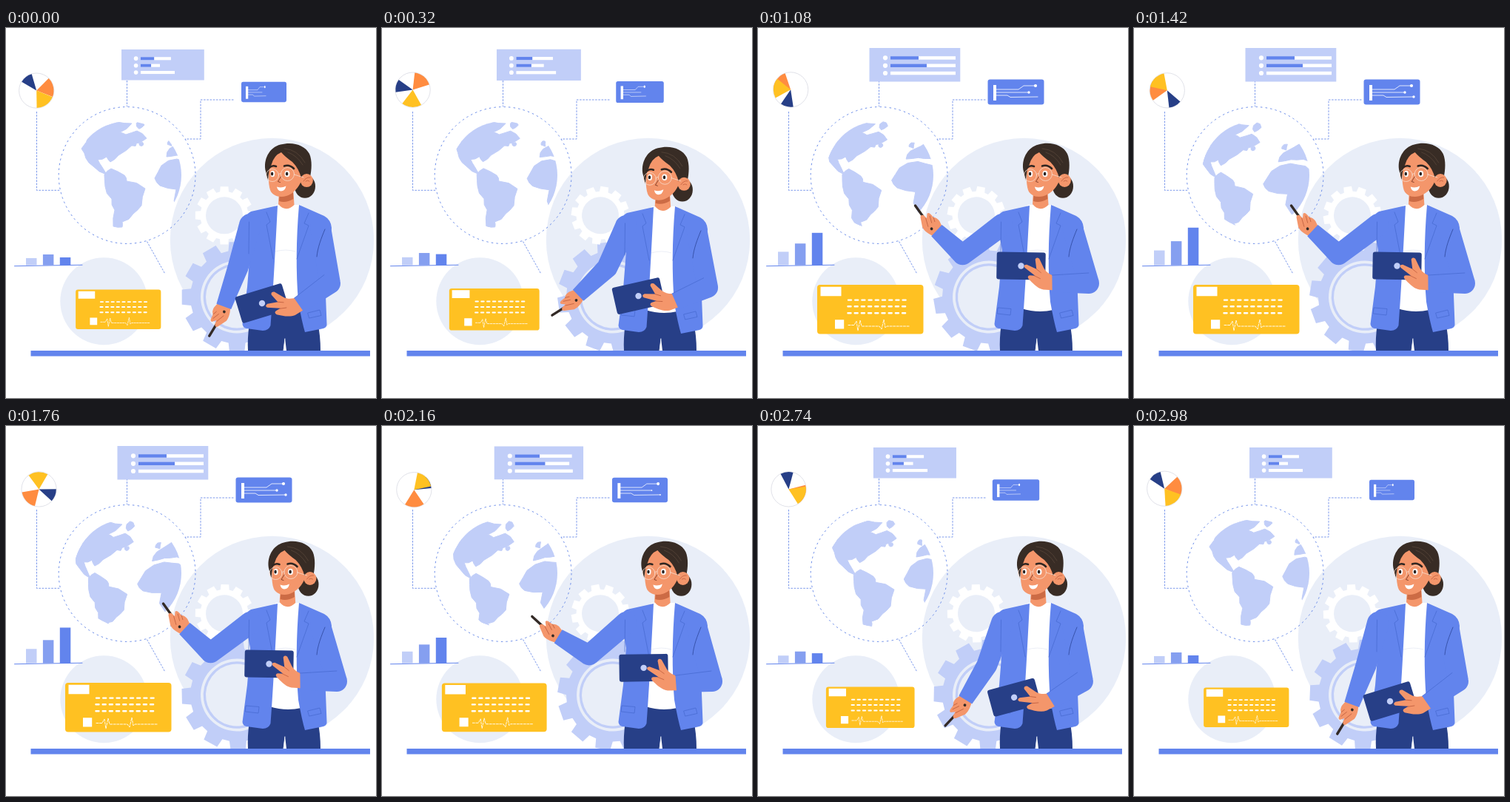
Animation of 500 by 500 pixels, one loop 3 s. Source, as an HTML page:

```html
<!DOCTYPE html>
<html lang="en">
<head>
<meta charset="utf-8">
<title>Data presentation</title>
<style>
  html, body { margin: 0; width: 100%; height: 100%; overflow: hidden; background: #fff; }
  svg { display: block; width: 100vw; height: 100vh; }
  .pale { fill: #e9eef8; }
  .sky { fill: #c1cef8; }
  .mid { fill: #859ff0; }
  .blue { fill: #6284ed; }
  .navy { fill: #273f87; }
  .gold { fill: #ffc122; }
  .white { fill: #fff; }
  .skin { fill: #f4966b; }
  .hair { fill: #382c25; }
  .line { fill: none; stroke-linecap: round; stroke-linejoin: round; }
  .link { fill: none; stroke: #5b7fe6; stroke-width: .8; stroke-dasharray: 2.6 1.6; }
  .seam { stroke: #4163c9; stroke-width: .6; }
  .crease { stroke: #b9583a; stroke-width: .7; }
</style>
</head>
<body>
<svg viewBox="0 0 500 500">
  <defs><clipPath id="disc"><circle cx="164" cy="199" r="73"/></clipPath></defs>

  <circle class="pale" cx="359.5" cy="286.5" r="137.7"/>
  <circle class="pale" cx="132.3" cy="369.3" r="59"/>
  <g id="bigGear">
    <path class="sky"/>
    <circle class="pale" r="49"/><circle class="sky" r="45.3"/><circle class="pale" r="42"/>
  </g>
  <g id="smallGear"><path class="white"/><circle class="pale" r="25"/></g>

  <circle class="link" cx="163.6" cy="199" r="92.4" style="stroke-width:.9;stroke-dasharray:2.5 4.1"/>
  <path class="link" d="M163.5 71V106M307.5 97H263V150H242M41.5 113V219.3H73M190.5 288.5L214.5 331.5"/>
  <g clip-path="url(#disc)"><path id="land" class="sky" stroke="#c1cef8" stroke-linejoin="round"/></g>

  <g id="pie">
    <circle r="23.6" fill="#fff" stroke="#d8dae2" stroke-width=".8"/>
    <path class="navy"/><path fill="#ff8c40"/><path class="gold"/>
  </g>

  <g id="list">
    <path class="sky" d="M150.5 27H273.3V72.6H150.5Z"/>
    <g class="white"><circle cx="172" cy="40.3" r="3.1"/><circle cx="172" cy="50.8" r="3.1"/><circle cx="172" cy="61" r="3.1"/></g>
    <g id="meters"></g>
  </g>

  <g id="chip">
    <rect class="blue" x="310.5" y="69.5" width="76" height="34" rx="3"/>
    <path class="white" d="M318 77h4v21h-4z"/>
    <g id="wires">
      <path class="line" stroke="#fff" stroke-width=".8" d="M0-4H30L37-9H53M0 0H44M0 4H15L19 6.5 56 6"/>
      <g class="white"><circle cx="53" cy="-9" r="2.1"/><circle id="dotB" cx="44" r="1.7"/><circle id="dotC" cx="56" cy="6" r="1.7"/></g>
    </g>
  </g>

  <path class="line" stroke="#6284ed" d="M11.5 321.7L103 320.2"/>
  <g id="bars"></g>

  <g id="card">
    <rect class="gold" x="80" y="347" width="143.5" height="66.6" rx="4"/>
    <path class="white" d="M84.5 349.7h28v12.500h-28zM104 394.300h12.200v12.200H104z"/>
    <path class="line" stroke="#fff" stroke-width="2.4" stroke-dasharray="4 5.2" d="M122 367.6H201M121.5 376.3H201M121.5 385.3H201"/>
    <path class="line" stroke="#fff" stroke-width=".9" stroke-dasharray="3 1.600" d="M122 401.500H130L133 396 135 409 138 395 140 403H164L167 407 170 394 172 405 174 403H205"/>
  </g>

  <path class="navy" d="M329 398Q326 420 327 436H374.5L377 419 379 436H425Q425 415 421 398L397 378H356Z"/>
  <path class="line" stroke="#e9eef8" d="M376.8 420L375.5 435.5"/>

  <g id="body">
    <path class="white" d="M364 239L398 239 399 381Q378 386 356 379Z"/>
    <path class="line" stroke="#e3e7f2" stroke-width=".7" d="M364 302Q378 298 391 302"/>
    <path class="blue" d="M367 240L331 248Q322 252 323 263L330 300 326 350 319.500 400Q320 405 325 406L347 409Q355 409 357.500 402Q362 340 367 240Z"/>
    <path class="blue" d="M396 239L430 254Q439 259 440 270L431 335 433.500 400Q434 404 429 406L404 411Q400 398 395 370 390 310 396 239Z"/>
    <path class="line seam" d="M352 249L357 262 352 266 361 312M409 250L403 264 409 267 393 312M324.5 378L342 379.5 341 388 323.5 386ZM408 385L424 381 426 388.5 410 392Z"/>

    <g id="penHand">
      <path class="line" stroke="#332a26" stroke-width="3.4" d="M5-3L44 4.800"/>
      <path class="skin" d="M-4-8C4-11 11-12 17-10L28-2Q31 1 27 3L21 3 25 8Q25 11 20 10.500L15 10Q12 13 6 12L-4 8Z"/>
      <path class="line crease" d="M12-4L22 2M12 3L20 8M10 7L15 10"/>
      <circle cx="6.5" cy="-3" r="1.9" fill="#332a26"/>
    </g>
    <path id="armL" class="blue"/>
    <path class="line seam" d="M328.5 262L328 305"/>

    <g id="tablet">
      <rect class="navy" x="-33" y="-18.5" width="66" height="37" rx="3"/>
      <circle class="sky" r="4.200"/>
    </g>
    <g id="holdHand">
      <path class="skin" d="M-4-9L12-8C21-6 27 2 32 7Q34 11 30 11.500L23 11 37 22Q39 26 34 26L21 20 22.500 33Q21 37 17 34L11 21C8 15 2 12-4 10Z"/>
      <path class="line crease" d="M24 11L16 7M21 20L15 15"/>
    </g>
    <path id="armR" class="blue"/>
    <path class="line" stroke="#2e479b" stroke-width=".8" d="M431 272C426 284 421 297 420 309"/>
    <path id="seamR" class="line seam"/>
  </g>

  <g id="neck">
    <path class="skin" d="M369 220L368 238Q378 250 389.5 239L388 216Z"/>
    <path fill="#cc6b45" d="M369.5 227Q380 229 388 222L388.3 231Q378 237 369 234Z"/>
  </g>
  <g id="head">
    <ellipse class="hair" cx="404" cy="214" rx="14" ry="15.8"/>
    <path class="skin" d="M357 176C354 192 354 210 357 219C361 229 374 230 383 225C392 220 398 212 400 203L402 172Q374 160 357 176Z"/>
    <path class="hair" d="M351 194C347 178 356 161 371 157.500C387 153 404 158 410 170C414 179 413 192 411 201L399 203Q396 190 387 181 377 174 372 168 362 172 358.500 185Q355 190 354 206Z"/>
    <path class="line" stroke="#5c4a3d" stroke-width=".7" d="M376 163Q394 164 404 182M381 168Q393 172 401 185"/>
    <ellipse class="skin" cx="406.3" cy="206" rx="8.6" ry="9"/>
    <path class="line crease" d="M402 207Q406 201 411 202M405 207Q408 205 410 207"/>
    <path class="line" stroke="#2f2622" stroke-width="2.6" d="M356 188.5Q360 185 365 187M376 186.500Q383 184 389 190"/>
    <g class="white"><ellipse cx="360.300" cy="197" rx="2.900" ry="4.200"/><ellipse cx="380" cy="197" rx="3.500" ry="4.300"/></g>
    <g fill="#2a2220"><ellipse cx="359.600" cy="197" rx="1.700" ry="2.500"/><ellipse cx="379.600" cy="197" rx="1.800" ry="2.600"/></g>
    <g class="line" stroke="#f8dccd" stroke-width=".8"><circle cx="360" cy="199" r="8.500"/><circle cx="380.500" cy="197.500" r="9"/><path d="M368.500 197.500Q370 196 371.500 197M389.500 198L402 202"/></g>
    <path class="line" stroke="#7d3a28" stroke-width=".9" d="M371.500 201L367.500 207.500 370.500 208.500"/>
    <path class="white" d="M366 214.500Q372 217 378.500 213.500 377 220.500 371.500 220.500 367 220 366 214.500Z"/>
  </g>

  <path class="blue" d="M33.5 436H492V443.500H33.5Z"/>
</svg>
<script>
const LOOP = 3000;
const $ = id => document.getElementById(id);
const mix = (a, b, k) => a + (b - a) * k;
const clamp = x => Math.min(1, Math.max(0, x));
const ease = x => (1 - Math.cos(Math.PI * clamp(x))) / 2;
const rad = d => d * Math.PI / 180;
const polar = (r, deg) => [r * Math.cos(rad(deg)), r * Math.sin(rad(deg))];
const reach = (p, len, deg) => polar(len, deg).map((v, i) => v + p[i]);
const poly = pts => 'M' + pts.map(p => p.map(v => v.toFixed(2)).join(' ')).join('L') + 'Z';
const move = (id, x, y, turn = 0) => $(id).setAttribute('transform', `translate(${x} ${y}) rotate(${turn})`);
const zoom = (id, x, y, s) => $(id).setAttribute('transform', `translate(${x} ${y}) scale(${s}) translate(${-x} ${-y})`);

// Eases up from the start, waits, then comes down in a second.
const hold = (t, back, rise = 1000) => t < back ? ease(t / rise) : 1 - ease((t - back) / 1000);

function addRect(id, cls, x, y, width, height) {
  const r = document.createElementNS('http://www.w3.org/2000/svg', 'rect');
  Object.entries({ class: cls, x, y, width, height }).forEach(a => r.setAttribute(...a));
  return $(id).appendChild(r);
}

let seed = 7;
const random = () => (seed = seed * 16807 % 2147483647) / 2147483647;

// --- Gears
function gear(outer, inner, teeth = 12) {
  const pts = [];
  for (let i = 0; i < teeth; i++)
    for (const [r, k] of [[inner, -.35], [outer, -.26], [outer, .26], [inner, .35]])
      pts.push(polar(r, (i + k) * 360 / teeth));
  return poly(pts);
}
$('bigGear').firstElementChild.setAttribute('d', gear(75, 63));
$('smallGear').firstElementChild.setAttribute('d', gear(39.5, 32.5));

// --- Globe: a few key points per coast, roughened between them
const coast = text => {
  const pts = text.split(' ').map(p => p.split(',').map(Number));
  return pts.flatMap((p, i) => {
    const q = pts[(i + 1) % pts.length], bend = (random() - .35) * .22;
    return [p, [(p[0] + q[0]) / 2 + (q[1] - p[1]) * bend, (p[1] + q[1]) / 2 - (q[0] - p[0]) * bend]];
  });
};
const island = (x, y, r) => Array.from({ length: 7 }, (_, i) => reach([x, y], r * (.5 + random() * .7), i * 51));
const land = [
  coast('102,163 112,144 125,135 150,127 170,129 154,141 162,144 177,139 190,149 172,157 152,172 141,181 136,174 124,178 130,188 136,198 118,187 108,176'),
  coast('133,198 142,190 160,199 163,207 188,217 183,240 172,251 157,262 157,269 145,268 147,246 143,231 134,214'),
  coast('201,203 210,186 231,177 247,182 265,200 258,232 244,247 232,248 230,218 208,213'),
  coast('217,174 221,163 240,148 258,178 244,173 231,172'),
  island(221, 156, 4), island(181, 131, 7), island(173, 157, 3.5), island(183, 157, 3)
];

function drawLand(t) {
  const lin = 1 - Math.abs(1 - t / 1500);
  const turn = .29 * mix(lin, ease(lin), .3);
  const drop = t > 1000 ? 11 * Math.sin(Math.PI * (t - 1000) / 2000) : 0;
  const R = 97, rim = 72.5, roll = .2 * turn;
  const spin = ([px, py]) => {
    const x = px - 164, y = py - 199, z = Math.sqrt(Math.max(0, R * R - x * x - y * y));
    const u = x * Math.cos(turn) - z * Math.sin(turn) - roll * y;
    const v = y + roll * x + drop * Math.max(0, z - 50) / 47;
    const fit = Math.min(1, rim / Math.max(rim, Math.hypot(u, v)) + (Math.hypot(x, y) > rim ? 1 : 0));
    return [164 + u * fit, 199 + v * fit];
  };
  $('land').setAttribute('d', land.map(s => poly(s.map(spin))).join(''));
}

// --- Charts
function drawPie(t) {
  const a = 2 * Math.PI * t / LOOP;
  move('pie', 43 - 1.8 * Math.cos(a), 84.6 - 1.6 * Math.sin(a));
  const slice = (i, from, size, dir) => {
    const start = from + dir * 360 * t / LOOP - 90;
    const d = `M0 0L${polar(23.3, start)}A23.3 23.3 0 0 1 ${polar(23.3, start + size)}Z`;
    $('pie').querySelectorAll('path')[i].setAttribute('d', d);
  };
  slice(0, 301, 43, -1);
  slice(1, 45, 66, -1);
  slice(2, 112, 67, 1);
}

// row, first and last right end
const meters = [[0, 224, 267], [0, 199, 217], [1, 207.6, 267], [1, 194.5, 228], [2, 229.6, 267]].map(([row, from, to], i) => {
  const r = addRect('meters', i % 2 ? 'blue' : 'white', 179, 38.2 + 10.3 * row, 1, 4.5);
  return k => r.setAttribute('width', mix(from, to, k) - 179);
});

const bars = [['sky', 311, 10.5], ['mid', 306, 18], ['blue', 310, 40.5]].map(([cls, low, rise], i) => {
  const r = addRect('bars', cls, 27 + 22.9 * i, low, 14.5, 1);
  return k => {
    r.setAttribute('y', low - rise * k);
    r.setAttribute('height', 320.7 - low + rise * k);
  };
});

function drawCharts(t) {
  drawPie(t);
  const list = hold(t, 1850, 1100);
  zoom('list', 212, 49.8, mix(.91, 1, list));
  meters.forEach(set => set(list));

  const k = hold(t, 2000);
  zoom('card', 151.75, 380.3, mix(.803, 1, k));
  zoom('chip', 348.5, 86.5, mix(.803, 1, k));
  $('wires').setAttribute('transform', `translate(322 87) scale(${mix(.53, 1, k)} 1)`);
  const dot = 1.7 * clamp((k - .88) * 9);
  $('dotB').setAttribute('r', dot);
  $('dotC').setAttribute('r', dot * clamp((t - 1080) / 300));

  const wave = ease(2 * Math.min(t, LOOP - t) / LOOP);
  bars.forEach(set => set(wave));
}

// --- Woman
const angle = (p, q) => Math.atan2(q[1] - p[1], q[0] - p[0]) * 180 / Math.PI;

// Two tapered limbs with round shoulder and elbow
function sleeve([a, b, c], [wa, wb, wc]) {
  const limb = (p, q, u, v) => {
    const side = angle(p, q) + 90;
    return poly([reach(p, u, side), reach(p, -u, side), reach(q, -v, side), reach(q, v, side)]);
  };
  const ball = ([x, y], r) => `M${x - r} ${y}a${r} ${r} 0 1 1 ${2 * r} 0a${r} ${r} 0 1 1 ${-2 * r} 0Z`;
  return limb(a, b, wa, wb) + limb(b, c, wb, wc) + ball(a, wa) + ball(b, wb);
}

function drawWoman(t) {
  const p = hold(t, 1950), turned = hold(t, 1300);
  const nod = t < 800 ? Math.sin(Math.PI * t / 800) : 0;
  move('body', 0, 2 * nod);
  move('neck', 3 * turned, 3 * nod);
  move('head', 8 * turned, 5 * nod);

  const fore = mix(110, 223, p);
  const shoulder = [330, 266];
  const elbow = reach(shoulder, 60 + 7 * p, mix(106, 143, p));
  const wrist = reach(elbow, 56 - 8 * p, fore);
  $('armL').setAttribute('d', sleeve([shoulder, elbow, wrist], [15, 14, 10.5]));
  move('penHand', ...wrist, fore);

  move('tablet', 346 + 9.5 * p * p, mix(372, 321.5, p), mix(-17, 1, p));

  const elbow2 = [mix(438, 447, p), 345 + 4 * nod];
  const wrist2 = [mix(396, 397.5, p), mix(374.5, 345.5, p)];
  const aim = angle(elbow2, wrist2);
  $('armR').setAttribute('d', sleeve([[425, 270], elbow2, wrist2], [14, 14, 11.5]));
  move('holdHand', ...wrist2, aim);
  $('seamR').setAttribute('d', `M${reach(elbow2, 14, aim + 90)}L${reach(wrist2, 11.5, aim + 90)}`);
}

function draw(t) {
  const turn = 360 * t / LOOP;
  move('smallGear', 295, 253.3, turn);
  move('bigGear', 312, 363.5, -turn);
  drawLand(t);
  drawCharts(t);
  drawWoman(t);
}

const start = performance.now();
function tick() {
  draw((performance.now() - start) % LOOP);
  requestAnimationFrame(tick);
}
tick();
</script>
</body>
</html>
```
